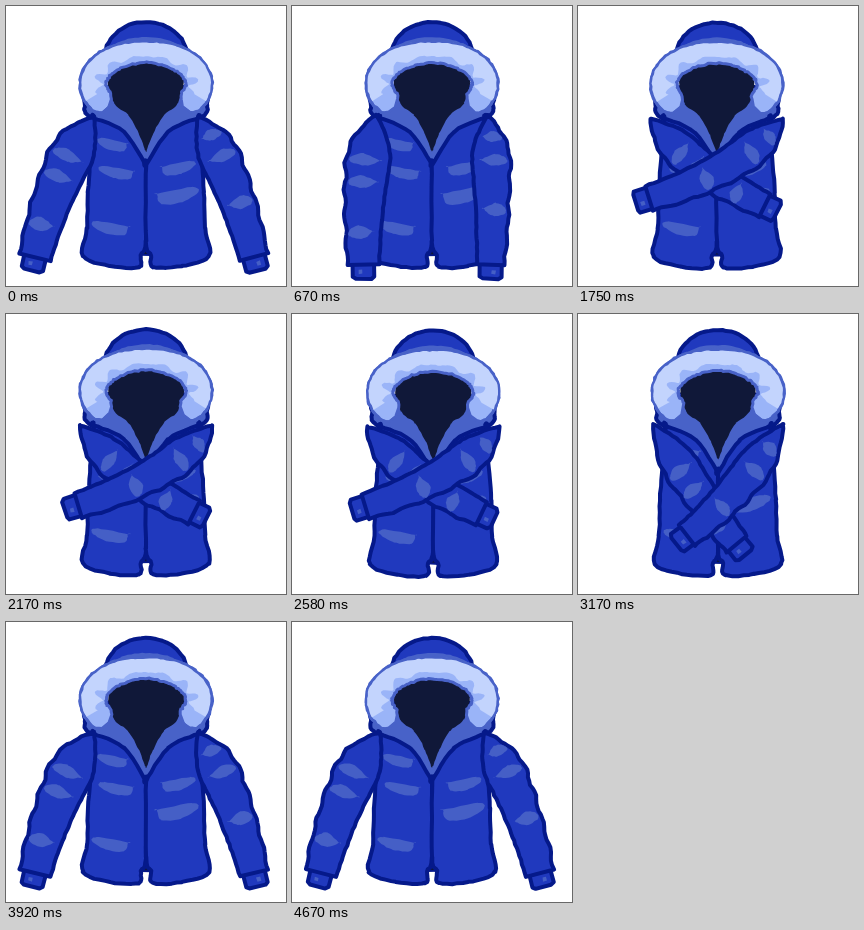
An HTML page with a canvas for the animation above (4.76 s loop, 280 by 280 pixels).

```html
<!DOCTYPE html>
<html lang="en">
<head>
<meta charset="utf-8">
<title>Winter jacket</title>
<style>
html, body { margin: 0; width: 100%; height: 100%; overflow: hidden; background: #fff; }
canvas { display: block; width: 100vmin; height: 100vmin; }
</style>
</head>
<body>
<canvas id="stage" width="280" height="280"></canvas>
<script>
const canvas = document.getElementById('stage');
const ctx = canvas.getContext('2d');
const LOOP = 4760, RATE = 0.012, MID = 140;
const INK = '#05198a', BLUE = '#2039be', LINING = '#4862c8', PATCH = '#455fc6';
const DARK = '#101839', FUR = '#c3d4fd', SHADE = '#9ab4f8', HOOD = '#2039be';

const lerp = (a, b, k) => a + (b - a) * k;
const clamp = (v, lo, hi) => Math.min(hi, Math.max(lo, v));
const mirrored = pts => pts.concat(pts.map(([x, y]) => [2 * MID - x, y]).reverse());

let seed = 1;
function rand() {
  seed = (seed * 16807) % 2147483647;
  return seed / 2147483647;
}

// Runs fn for n + 1 even steps from a to b.
function steps(n, a, b, fn) {
  return Array.from({ length: n + 1 }, (_, i) => fn(lerp(a, b, i / n)));
}

function draw(pts, fill, width = 4, line = INK, rough = 0.8) {
  ctx.beginPath();
  for (const [x, y] of pts) ctx.lineTo(x + (rand() - 0.5) * rough, y + (rand() - 0.5) * rough);
  ctx.closePath();
  ctx.fillStyle = fill;
  ctx.fill();
  if (!width) return;
  ctx.strokeStyle = line;
  ctx.lineWidth = width;
  ctx.stroke();
}

// Closed smooth curve through a few points; a doubled point makes a corner.
function smooth(pts) {
  const n = pts.length;
  return pts.flatMap((b, i) => {
    const a = pts[(i + n - 1) % n], c = pts[(i + 1) % n], d = pts[(i + 2) % n];
    return steps(6, 0, 1, t => [0, 1].map(j => b[j] + 0.5 * t * (c[j] - a[j]
      + t * (2 * a[j] - 5 * b[j] + 4 * c[j] - d[j] + t * (3 * b[j] - a[j] - 3 * c[j] + d[j])))));
  });
}

function onRight(paint) {
  ctx.save();
  ctx.translate(2 * MID, 0);
  ctx.scale(-1, 1);
  paint();
  ctx.restore();
}

// Arm poses from open to folded: a bent centre line with a half width.
const pose = (sx, sy, bx, by, wx, wy, width) => ({ sx, sy, bx, by, wx, wy, width });
const LEFT = {
  poses: [pose(88, 111, 50, 165, 29, 251, 22), pose(84, 109, 70, 172, 72, 259, 22),
    pose(75, 110, 120, 182, 158, 231, 18), pose(74, 112, 115, 164, 188, 199, 18)],
  quilts: [0.33, 0.48, 0.8]
};
const RIGHT = {
  poses: [pose(88, 111, 54, 165, 32, 251, 20), pose(84, 109, 78, 172, 82, 259, 19),
    pose(75, 110, 120, 182, 170, 222, 18), pose(74, 112, 114, 163, 208, 192, 18)],
  quilts: [0.16, 0.33, 0.66]
};

function blend(poses, p) {
  const i = Math.min(poses.length - 2, Math.floor(p));
  const res = {};
  for (const key in poses[i]) res[key] = lerp(poses[i][key], poses[i + 1][key], p - i);
  return res;
}

function sleeve({ poses, quilts }, p) {
  const { sx, sy, bx, by, wx, wy, width } = blend(poses, p);
  // Point at s along the arm and v across it: -1 inner edge, 1 outer edge.
  const at = (s, v) => {
    const q = 1 - s;
    const dx = q * (bx - sx) + s * (wx - bx), dy = q * (by - sy) + s * (wy - by);
    const w = width * Math.sin(clamp(s / 0.35, 0, 1) * Math.PI / 2) ** 0.9
      * (1 - 0.28 * clamp((s - 0.35) / 0.65, 0, 1));
    const k = v * w / Math.hypot(dx, dy);
    return [q * q * sx + 2 * q * s * bx + s * s * wx - dy * k,
      q * q * sy + 2 * q * s * by + s * s * wy + dx * k];
  };

  const end = Math.hypot(wx - bx, wy - by);
  const ux = (wx - bx) / end, uy = (wy - by) / end;
  const cuff = (d, v) => [wx + ux * d - uy * v, wy + uy * d + ux * v];
  draw([cuff(-4, 11), cuff(12, 11), cuff(14, 8), cuff(14, -8), cuff(12, -11), cuff(-4, -11)], BLUE);
  draw([cuff(5, 5), cuff(9, 5), cuff(9, 1), cuff(5, 1)], PATCH, 0);

  const puff = s => 1 + 0.06 * Math.sin(s * Math.PI * 12);
  const outer = steps(40, 0, 1, s => at(s, puff(s)));
  const inner = steps(40, 1, 0, s => at(s, -1));
  draw(outer.concat(inner), BLUE);

  for (const s of quilts) {
    const tip = at(s, -0.55);
    draw(smooth([at(s - 0.035, 0.25), at(s, 0.8), at(s + 0.035, 0.75), at(s + 0.045, 0), tip, tip]), PATCH, 0);
  }
}

function patch(x, y, w, h) {
  const tip = [x + w, y + h * 0.4];
  draw(smooth([[x, y + h * 0.3], [x + w * 0.15, y], tip, tip, [x + w * 0.9, y + h], [x + w * 0.4, y + h * 0.9]]), PATCH, 0);
}

function dome(rx, ry, base, fill, width) {
  draw(steps(30, 0, Math.PI, a => [MID + rx * Math.cos(a), base - ry * Math.sin(a)]), fill, width);
}

function hood() {
  dome(41, 34, 50, HOOD, 4);
  dome(36, 15, 46, LINING, 0);
  draw(smooth(mirrored([[90, 82], [79, 100], [84, 111], [116, 128], [139, 160]])), LINING);
  draw(smooth(mirrored([[126, 56], [103, 70], [108, 97], [122, 109], [133, 128], [139, 144]])), DARK, 0);
}

function panel() {
  const shoulder = [88, 112], neck = [140, 159];
  draw(smooth([shoulder, shoulder, [118, 126], neck, neck, [140, 235], [135, 249], [133, 261],
    [104, 260], [77, 250], [81, 222], [82, 186], [85, 146]]), BLUE);
}

function torso() {
  draw([[MID, 230], [134, 249], [146, 249]], DARK, 2);
  panel();
  onRight(panel);
  patch(91, 132, 30, 13);
  patch(93, 160, 34, 13);
  patch(86, 215, 36, 14);
  onRight(() => {
    patch(91, 155, 33, 14);
    patch(88, 181, 41, 17);
  });
}

// Fur ring: an ellipse band open at the bottom; v is -1 inside, 1 outside.
function furAt(deg, v) {
  const a = deg * Math.PI / 180, c = Math.cos(a), s = Math.sin(a);
  const nx = c / 53, ny = s / 32, n = Math.hypot(nx, ny);
  const tail = clamp((Math.abs(deg - 90) - 122) / 14, 0, 1);
  const r = (10.5 + 2.5 * Math.abs(c)) * Math.sqrt(1 - tail * tail) * v;
  return [MID + 53 * c + nx / n * r, 78 - 32 * s - ny / n * r];
}

function fur() {
  const band = (from, to, edge) => steps(80, from, to, d => furAt(d, 1))
    .concat(steps(80, to, from, d => furAt(d, edge(d))));
  draw(band(-46, 226, () => -1), SHADE, 3, LINING, 1.4);
  const tufts = d => -0.4 + 0.4 * Math.sin(d / 5) * Math.abs(Math.cos(d * Math.PI / 180));
  draw(band(-20, 200, tufts), FUR, 0);
  const rim = steps(80, -46, 226, d => furAt(d, 1));
  ctx.beginPath();
  for (const [x, y] of rim) ctx.lineTo(x + rand() - 0.5, y + rand() - 0.5);
  ctx.strokeStyle = LINING;
  ctx.lineWidth = 2.4;
  ctx.stroke();
}

// How far the arms are folded: 0 open, 1 hanging, 2 crossed low, 3 hugging.
function fold(t) {
  const closing = [330, 670, 930, 1210], opening = [3890, 3530, 3170, 2920];
  const keys = t < 2000 ? closing : opening;
  const progress = keys.slice(1).reduce((sum, end, i) => sum + clamp((t - keys[i]) / (end - keys[i]), 0, 1), 0);
  if (progress < 1) return progress ** 1.7;
  return progress > 2 ? 3 - (3 - progress) ** 1.7 : progress;
}

// Twelve drawings a second, with starts rounded to 10 ms.
const startOf = i => Math.round(i / RATE / 10) * 10;
function drawingAt(t) {
  let i = Math.floor(t * RATE);
  if (startOf(i + 1) <= t) i++;
  if (startOf(i) > t) i--;
  return Math.min(56, i);
}

function render(now) {
  const i = drawingAt(now % LOOP), p = fold(i / RATE);
  const size = Math.max(1, Math.round(Math.min(innerWidth, innerHeight) * (devicePixelRatio || 1)));
  if (canvas.width !== size) canvas.width = canvas.height = size;
  seed = 7919 + i * 104729;

  ctx.setTransform(size / 280, 0, 0, size / 280, 0, 0);
  ctx.fillStyle = '#fff';
  ctx.fillRect(0, 0, 280, 280);
  ctx.lineJoin = ctx.lineCap = 'round';
  const shiver = Math.max(0, p - 2);
  ctx.translate(-1.2 * shiver * Math.sin(i * Math.PI / 2), -0.6 * shiver * Math.cos(i * Math.PI));
  hood();
  torso();
  sleeve(LEFT, p);
  onRight(() => sleeve(RIGHT, p));
  fur();
}

function tick(now) {
  render(now);
  requestAnimationFrame(tick);
}
render(0);
requestAnimationFrame(tick);
</script>
</body>
</html>
```
